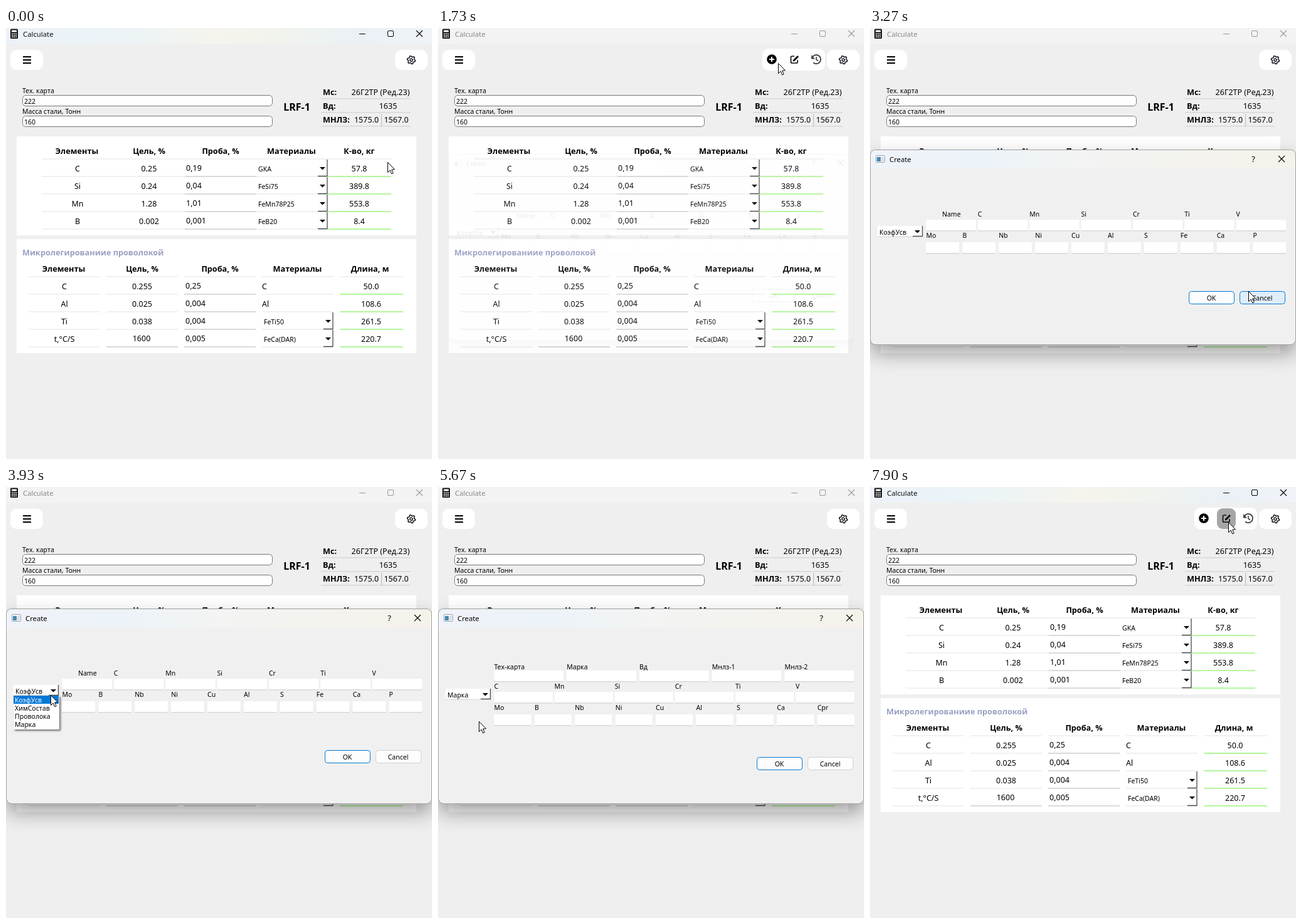
An HTML page with a canvas for the animation above (8000 ms loop, 679x688 px).

```html
<!DOCTYPE html>
<html lang="ru">
<head>
<meta charset="utf-8">
<title>Calculate</title>
<style>
html, body { margin: 0; width: 100%; height: 100%; overflow: hidden; background: #efefef; }
canvas { display: block; }
</style>
</head>
<body>
<canvas id="stage" width="679" height="688"></canvas>
<script>
const W = 679, H = 688, LOOP = 8000;
const stage = document.getElementById('stage').getContext('2d');
const layer = new OffscreenCanvas(W, H).getContext('2d');
let g = stage;

const FAMILY = '"Noto Sans", "Open Sans", sans-serif';
const SMALL = `10.5px ${FAMILY}`, BODY = `12.5px ${FAMILY}`, BOLD = `bold 12.7px ${FAMILY}`;
const TITLE = `11.3px ${FAMILY}`;
const CELL = '#f1f1f1', INPUT = '#dadada', GREEN = '#b3f79d';

const ramp = (t, a, b) => Math.min(1, Math.max(0, (t - a) / (b - a)));
const ease = p => p * p * (3 - 2 * p);
const inside = (c, x, y, w, h) => c.x >= x && c.x < x + w && c.y >= y && c.y < y + h;

function text(s, x, y, font = BODY, align = 'left', color = '#000') {
  g.font = font;
  g.textAlign = align;
  g.fillStyle = color;
  g.fillText(s, x, y);
}
function rect(x, y, w, h, color) {
  g.fillStyle = color;
  g.fillRect(x, y, w, h);
}
function round(x, y, w, h, r, fill, line) {
  g.beginPath();
  g.roundRect(x, y, w, h, r);
  g.fillStyle = fill;
  g.fill();
  if (line) stroke(line, 1);
}
function stroke(color, width) {
  g.strokeStyle = color;
  g.lineWidth = width;
  g.stroke();
}
// Open paths, each a flat list of x, y pairs
function lines(color, width, ...paths) {
  g.beginPath();
  for (const p of paths)
    for (let i = 0; i < p.length; i += 2) g[i ? 'lineTo' : 'moveTo'](p[i], p[i + 1]);
  stroke(color, width);
}
function poly(color, ...p) {
  g.beginPath();
  for (let i = 0; i < p.length; i += 2) g.lineTo(p[i], p[i + 1]);
  g.closePath();
  g.fillStyle = color;
  g.fill();
}
function gradient(...colors) {
  const grad = g.createLinearGradient(0, 0, W, 0);
  colors.forEach((c, i) => grad.addColorStop(i / (colors.length - 1), c));
  return grad;
}
function cross(x, y, color) {
  lines(color, 1.1, [x - 5, y - 5, x + 5, y + 5], [x + 5, y - 5, x - 5, y + 5]);
}
function dropButton(x, y, w, h) {
  rect(x, y, w, h, '#fff');
  lines('#4a4a4a', 1.3, [x, y + h - .5, x + w - .5, y + h - .5, x + w - .5, y]);
  const cx = x + 7.5, cy = y + h / 2 - 1.5;
  poly('#000', cx - 4.5, cy, cx + 4.5, cy, cx, cy + 4.5);
}

function titleBar(active) {
  rect(0, 0, W, 25, active
    ? gradient('#edf2f8', '#eaf3f8', '#eef4f4', '#f6f4ec', '#f0f3ee', '#eaf1f6', '#f0f3f7')
    : '#f3f3f3');
  const ink = active ? '#000' : '#999';
  round(7, 1.5, 12, 15.5, 1.5, '#111');
  rect(9, 3.5, 8, 3, '#fff');
  for (let i = 0; i < 9; i++) rect(9 + i % 3 * 3, 8.5 + (i / 3 | 0) * 2.6, 2, 1.5, '#fff');
  text('Calculate', 27, 14, TITLE, 'left', active ? '#111' : '#888');
  lines(ink, 1, [563, 9.5, 573, 9.5]);
  g.beginPath();
  g.roundRect(608.5, 4.5, 9, 9, 1.5);
  stroke(ink, 1);
  cross(659, 9, ink);
}

function gear(x, y) {
  g.beginPath();
  for (let i = 0; i <= 24; i++) {
    const a = (i + .5) / 24 * Math.PI * 2, r = i % 4 < 2 ? 6.6 : 4.9;
    g.lineTo(x + r * Math.cos(a), y + r * Math.sin(a));
  }
  g.closePath();
  g.lineJoin = 'round';
  stroke('#1c1c24', 1.6);
  g.beginPath();
  g.arc(x, y, 2.1, 0, 7);
  stroke('#1c1c24', 1.5);
}

function toolMenu(p, cur) {
  if (!p) return;
  const left = 617 - 100 * p;
  g.save();
  g.beginPath();
  g.roundRect(left, 33, 100 * p, 35, Math.min(10, 50 * p));
  g.fillStyle = '#fff';
  g.fill();
  g.clip();
  g.translate(left - 517, 0);
  if (p === 1)
    for (const x of [517, 553, 588])
      if (inside(cur, x, 34, 30, 33)) round(x, 34, 30, 33, 9, '#a6a6a6');
  g.beginPath();
  g.arc(532, 50, 7.8, 0, 7);
  g.fillStyle = '#000';
  g.fill();
  lines('#fff', 2, [528, 50, 536, 50], [532, 46, 532, 54]);
  g.beginPath();
  g.moveTo(568, 45);
  g.lineTo(564.5, 45);
  g.quadraticCurveTo(562.5, 45, 562.5, 47);
  g.lineTo(562.5, 54);
  g.quadraticCurveTo(562.5, 56, 564.5, 56);
  g.lineTo(571, 56);
  g.quadraticCurveTo(573, 56, 573, 54);
  g.lineTo(573, 51);
  stroke('#111', 1.7);
  lines('#111', 3, [567, 52, 574, 45]);
  poly('#111', 565.5, 53.5, 566.2, 50.5, 568.5, 52.8);
  g.beginPath();
  g.arc(603, 50, 7, -2.7, 2.3);
  stroke('#444', 1.9);
  poly('#444', 595, 43, 595, 49.5, 601, 49.5);
  lines('#444', 1.6, [603, 46, 603, 50.5, 606, 52.5]);
  g.restore();
}

function topCard() {
  [['Тех. карта', '222'], ['Масса стали, Тонн', '160']].forEach(([label, value], i) => {
    const y = 33 * i;
    text(label, 26, 104 + y, SMALL);
    round(26.5, 107.5 + y, 398, 17, 5, '#fff', '#777');
    text(value, 29, 121 + y, SMALL);
  });
  text('LRF-1', 463.5, 132, `bold 16px ${FAMILY}`, 'center');
  ['Мс:', 'Вд:', 'МНЛЗ:'].forEach((s, i) => {
    text(s, 505, 107 + 22 * i, BOLD);
    rect(502, 112 + 22 * i, 143, 1.5, '#d8d8d8');
  });
  text('26Г2ТР (Ред.23)', 597, 107, BODY, 'center');
  text('1635', 609, 129, BODY, 'center');
  text('1575.0', 574.5, 151, BODY, 'center');
  text('1567.0', 622, 151, BODY, 'center');
  rect(598, 137, 1, 20, '#b4b8c0');
}

function table(cols, top, heads, rows, shift) {
  const { x, w, mid } = cols;
  heads.forEach((s, i) => {
    text(s, mid[i], top - 8, BOLD, 'center');
    rect(x[i], top - 1, w[i], 2, CELL);
  });
  rows.forEach(([name, goal, probe, material, amount], r) => {
    const base = top + 20 + 28 * r, y = top + 27 + 28 * r;
    const combo = material.length > 2, typedGoal = goal === '1600';
    [CELL, typedGoal ? INPUT : CELL, INPUT, CELL, GREEN]
      .forEach((c, i) => rect(x[i], y, w[i], 2, c));
    text(name, mid[0] + 1, base, BODY, 'center');
    text(goal, mid[1] - typedGoal, base - typedGoal, BODY, 'center');
    text(probe, x[2] + 2, base - 1);
    text(material, x[3] + (combo ? 3 : 0), base, combo ? SMALL : BODY);
    text(amount, mid[4] + shift, base, BODY, 'center');
    if (combo) dropButton(x[3] + 98, y - 26, 15.5, 27);
  });
}

const HEADS = ['Элементы', 'Цель, %', 'Проба, %', 'Материалы'];
const ALLOYS = [
  ['C', '0.25', '0,19', 'GKA', '57.8'],
  ['Si', '0.24', '0,04', 'FeSi75', '389.8'],
  ['Mn', '1.28', '1,01', 'FeMn78P25', '553.8'],
  ['B', '0.002', '0,001', 'FeB20', '8.4'],
];
const WIRES = [
  ['C', '0.255', '0,25', 'C', '50.0'],
  ['Al', '0.025', '0,004', 'Al', '108.6'],
  ['Ti', '0.038', '0,004', 'FeTi50', '261.5'],
  ['t,°C/S', '1600', '0,005', 'FeCa(DAR)', '220.7'],
];
const WIDTHS = [114, 114, 114, 114, 101];

function mainWindow(cur, active, menu) {
  rect(0, 0, W, H, '#efefef');
  titleBar(active);
  round(7, 35, 52, 32, 10, '#fff');
  lines('#000', 2, [27, 46, 40, 46], [27, 51, 40, 51], [27, 56, 40, 56]);
  round(620, 35, 52, 32, 10, inside(cur, 620, 35, 52, 32) ? '#a6a6a6' : '#fff');
  gear(646, 51);
  toolMenu(menu, cur);
  topCard();
  rect(17, 173, 637, 158, '#fff');
  rect(17, 337, 637, 182, '#fff');
  table({ x: [57, 171, 285, 399, 513], w: WIDTHS, mid: [113, 228, 342, 455, 563] },
    209, [...HEADS, 'К-во, кг'], ALLOYS, 0);
  text('Микролегированиие проволокой', 26, 363, BOLD, 'left', '#9aa0c4');
  table({ x: [36, 160, 284, 408, 532], w: WIDTHS, mid: [92, 217, 341, 464.5, 580] },
    397, [...HEADS, 'Длина, м'], WIRES, 2);
}

function fields(names, step, w, base, y) {
  names.split(' ').forEach((s, i) => {
    const x = 89.5 + step * i;
    text(s, s === 'Name' ? 115 : x, base, SMALL);
    rect(x, y, w, 18, '#fff');
    rect(x, y + 17, w, 1.5, '#d9d9d9');
  });
}

function pushButton(s, x, y, hot, primary) {
  round(x + .5, y + .5, 72, 20, 4, hot ? '#e0eef9' : '#fdfdfd',
    hot || primary ? '#0078d4' : '#d0d0d0');
  text(s, x + 36, y + 15, SMALL, 'center');
}

const KINDS = ['КоэфУсв', 'ХимСостав', 'Проволока', 'Марка'];

function dialog(t, cur) {
  const brand = t >= 5610, buttonY = brand ? 431 : 420, comboY = brand ? 322 : 316;
  g.save();
  g.shadowColor = 'rgba(0,0,0,.38)';
  g.shadowBlur = 32;
  g.shadowOffsetY = 14;
  round(1, 195, 677.5, 310, 8, '#f0f0f0');
  g.restore();
  g.save();
  g.beginPath();
  g.roundRect(1, 195, 677.5, 310, 8);
  g.clip();
  rect(0, 195, W, 29, gradient('#f0f3f9', '#ecf3f9', '#f3f4f3', '#f4f3ee', '#f5f2ea'));
  g.restore();
  g.beginPath();
  g.roundRect(.5, 194.5, 678, 311, 8);
  stroke('#a0a0a0', 1);

  round(9.5, 203.5, 14, 11, 1, '#f4f6f8', '#9aa3ab');
  rect(11, 206, 6, 7, '#4789ae');
  rect(18, 206, 4, 7, '#d5dde3');
  text('Create', 31, 214, TITLE);
  text('?', 611, 214, `13px ${FAMILY}`, 'center');
  cross(656, 209, '#000');

  if (brand) {
    fields('Тех-карта Марка Вд Мнлз-1 Мнлз-2', 115.75, 110.5, 291, 293);
    fields('C Mn Si Cr Ti V', 96.1, 93.5, 322, 327);
    fields('Mo B Nb Ni Cu Al S Ca Cpr', 64.4, 59, 356, 363);
  } else {
    fields('Name C Mn Si Cr Ti V', 82.35, 79.5, 301, 306);
    fields('Mo B Nb Ni Cu Al S Fe Ca P', 57.9, 52.5, 335, 342);
  }
  rect(12, comboY, 72, 18, '#fff');
  rect(12, comboY + 16.5, 56, 1.5, '#dedede');
  text(KINDS[brand ? 3 : 0], 15, comboY + 14, SMALL);
  dropButton(68, comboY, 16, 17);

  const cancelHot = inside(cur, 589, buttonY, 73, 21) || t >= 7090;
  pushButton('OK', 508, buttonY, inside(cur, 508, buttonY, 73, 21), t < 7090);
  pushButton('Cancel', 589, buttonY, cancelHot, false);

  if (t >= 3850 && !brand) {
    g.save();
    g.shadowColor = 'rgba(0,0,0,.55)';
    g.shadowBlur = 3;
    g.shadowOffsetX = g.shadowOffsetY = 2;
    rect(12, 333, 73, 54, '#fff');
    g.restore();
    const pick = Math.min(3, Math.max(0, Math.floor((cur.y - 333) / 13)));
    rect(12, 333 + 13 * pick, 72, 13, '#0078d7');
    KINDS.forEach((s, i) => text(s, 14, 344 + 13 * i, SMALL, 'left', i === pick ? '#fff' : '#000'));
  }
}

// Pointer stops: time, x, y
const PATH = [
  [260, 608, 214], [720, 648, 48], [1080, 646, 50], [1400, 542, 56], [1900, 542, 56],
  [2130, 395, 204], [2260, 395, 207], [2340, 395, 207], [2860, 622, 424], [3210, 622, 424],
  [3760, 74, 321], [3930, 71, 332], [4070, 70, 340], [4330, 66, 364], [4420, 66, 364],
  [4750, 74, 320], [5210, 62, 375], [5410, 65, 379], [5550, 65, 379], [5670, 65, 374],
  [6410, 500, 448], [6820, 630, 441], [7060, 630, 441], [7160, 630, 420], [7400, 646, 52],
  [7570, 645, 52], [7840, 571, 57], [7900, 571, 56],
];
function pointerAt(t) {
  const i = PATH.findIndex(p => p[0] > t);
  if (i <= 0) {
    const [, x, y] = PATH.at(i);
    return { x, y };
  }
  const [t0, x0, y0] = PATH[i - 1], [t1, x1, y1] = PATH[i];
  const p = ease(ramp(t, t0, t1));
  return { x: x0 + (x1 - x0) * p, y: y0 + (y1 - y0) * p };
}
function pointer({ x, y }) {
  g.save();
  g.translate(Math.round(x) + .5, Math.round(y) + .5);
  g.lineJoin = 'miter';
  poly('#fff', 0, 0, 0, 16, 3.7, 12.5, 6.2, 18.3, 8.7, 17.2, 6.2, 11.5, 11, 11.3);
  stroke('#000', 1);
  g.restore();
}

function draw(t) {
  const cur = pointerAt(t);
  const opening = ramp(t, 1720, 1860), closing = ramp(t, 7090, 7280);
  const menu = ease(ramp(t, 850, 1110)) * (1 - ramp(t, 1880, 1990)) + ease(ramp(t, 7440, 7700));
  g = stage;
  const open = opening > 0 && closing < 1;
  // The modal window takes the hover away from the main one
  mainWindow(open ? { x: -1, y: -1 } : cur, t < 1720 || t >= 7090, menu);
  if (open) {
    g = layer;
    g.clearRect(0, 0, W, H);
    dialog(t, cur);
    g = stage;
    const k = .95 + .05 * opening - .033 * closing;
    g.save();
    g.globalAlpha = opening * (1 - closing);
    g.translate(339.5, 350);
    g.scale(k, k);
    g.drawImage(layer.canvas, -339.5, -350);
    g.restore();
  }
  pointer(cur);
}

const start = performance.now();
function tick() {
  draw((performance.now() - start) % LOOP);
  requestAnimationFrame(tick);
}
tick();
</script>
</body>
</html>
```
